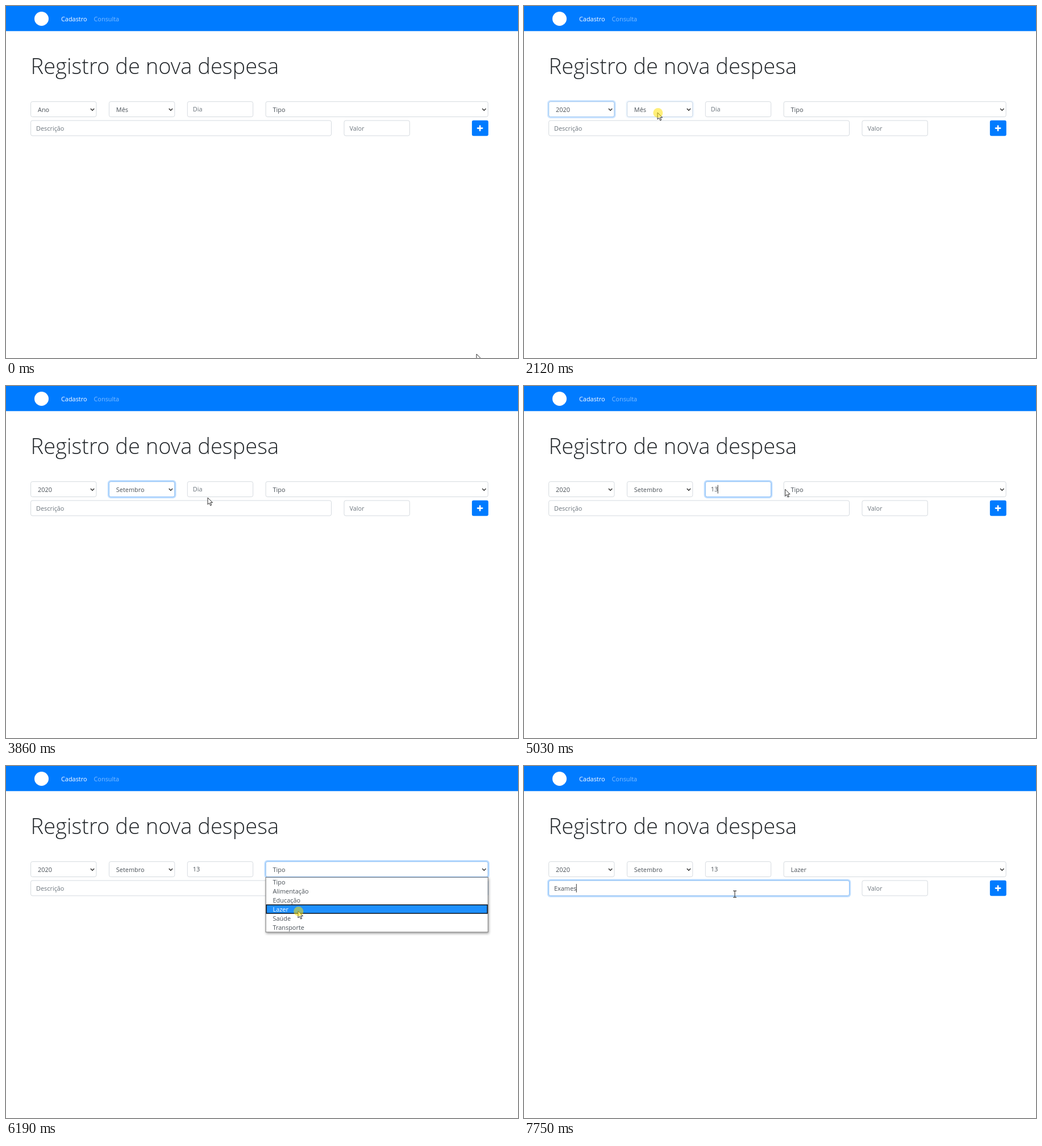
Recreate the animation shown at these times as an HTML page. Size 901x621 px, loop 8000 ms.

```html
<!DOCTYPE html>
<html lang="pt">
<head>
<meta charset="utf-8">
<title>Registro de nova despesa</title>
<style>
html, body { margin: 0; width: 100%; height: 100%; overflow: hidden; background: #fff; }
svg { display: block; width: 901px; height: 621px; font: 10.9px "Open Sans", "Noto Sans", sans-serif; }
</style>
</head>
<body>
<svg id="stage" viewBox="0 0 901 621">
  <defs>
    <filter id="shade" x="-10%" y="-20%" width="120%" height="150%">
      <feDropShadow dx="1" dy="2" stdDeviation="2" flood-color="#000" flood-opacity=".4"/>
    </filter>
  </defs>
  <rect width="901" height="621" fill="#fff"/>
  <rect width="901" height="44.3" fill="#007bff"/>
  <circle cx="62.5" cy="22.5" r="12.5" fill="#fff"/>
  <text x="97" y="26.8" fill="#fff">Cadastro</text>
  <text x="154.5" y="26.8" fill="#fff" fill-opacity=".5">Consulta</text>
  <text x="43.5" y="120" font-size="38.1" font-weight="300" fill="#212529">Registro de nova despesa</text>
  <rect x="819.9" y="201.7" width="28.9" height="27.6" rx="3" fill="#007bff"/>
  <path d="M830 215.6h8.2M834.1 211.5v8.2" stroke="#fff" stroke-width="2.6" stroke-linecap="round"/>
</svg>
<script>
const LOOP = 8000, STEP = 76, DELAY = 80, ROW = 16, HEIGHT = 26.85;
const COL = 137.85, GAP = 22.5;
const stage = document.getElementById("stage");

function add(tag, attrs, parent = stage, text = "") {
  const el = document.createElementNS("http://www.w3.org/2000/svg", tag);
  for (const name in attrs) el.setAttribute(name, attrs[name]);
  if (text) el.textContent = text;
  parent.append(el);
  return el;
}
const show = (el, on) => el.setAttribute("display", on ? "inline" : "none");
const clamp = (v, max = 1) => Math.max(0, Math.min(max, v));
const within = (t, from, to) => t >= from && t < to;

// In order of use: click times focus and pick, and text typed from a start at a steady pace
const fields = [
  { col: 0, span: 1, line: 0, focus: 920, pick: 1460, rows: "Ano 2020" },
  { col: 1, span: 1, line: 0, focus: 2090, pick: 3400,
    rows: "Mês Janeiro Fevereiro Março Abril Maio Junho Julho Agosto Setembro Outubro Novembro Dezembro" },
  { col: 2, span: 1, line: 0, focus: 4100, hint: "Dia", text: "13", start: 4630, pace: 150 },
  { col: 3, span: 3, line: 0, focus: 5340, pick: 6190,
    rows: "Tipo Alimentação Educação Lazer Saúde Transporte" },
  { col: 0, span: 4, line: 1, focus: 6510, hint: "Descrição", text: "Exames", start: 6650, pace: 220 },
  { col: 4, span: 1, line: 1, focus: LOOP, hint: "Valor", text: "", start: LOOP, pace: 1 }
];
const lists = fields.filter(f => f.rows), inputs = fields.filter(f => f.hint);
const clicks = fields.flatMap(f => f.pick ? [f.focus, f.pick] : [f.focus]);

// Pointer moves: start, end, x, y, power of the easing
const home = [828, 614];
const moves = [
  [70, 610, 100, 85], [610, 840, 72, 180], [1080, 1380, 87, 219], [1770, 2090, 235, 188],
  [2410, 2790, 245, 368, 2], [2940, 3320, 254, 351], [3630, 3860, 355, 197], [3960, 3960, 360, 184],
  [4860, 5170, 526, 181], [5730, 6040, 515, 266, .5], [6190, 6190, 514, 256], [6340, 6490, 371, 226]
];

function pointerAt(t) {
  let [px, py] = home;
  for (const [from, to, x, y, power = 1] of moves) {
    if (t < from) break;
    const steps = Math.round((to - from) / STEP) + 1;
    const k = clamp((Math.floor((t - from) / STEP + .1) + 1) / steps) ** power;
    px += (x - px) * k;
    py += (y - py) * k;
  }
  return [px, py];
}

const rowAt = (f, t) => clamp(Math.floor((pointerAt(t)[1] - 202) / ROW), f.names.length - 1);
const isOpen = (f, t) => within(t, f.focus + DELAY, f.pick + 150);

function valueAt(f, t) {
  if (f.rows) return f.names[t < f.pick + 150 ? 0 : rowAt(f, f.pick)];
  return f.text.slice(0, Math.max(0, Math.floor((t - f.start) / f.pace) + 1));
}

fields.forEach((f, i) => {
  f.x = 43.6 + f.col * COL;
  f.y = 168.66 + f.line * 33.4;
  f.w = f.span * COL - GAP;
  f.blur = i + 1 < fields.length ? fields[i + 1].focus : LOOP;
  f.textX = f.x + (f.rows ? 12.4 : 9.4);

  const box = { x: f.x, y: f.y, width: f.w, height: HEIGHT, rx: 3, "stroke-width": .85 };
  add("rect", { ...box, fill: "#fff", stroke: "#ced4da" });
  f.glow = add("g", { fill: "none" });
  add("rect", { ...box, stroke: "#80bdff" }, f.glow);
  add("rect", { x: f.x - 1.52, y: f.y - 1.52, width: f.w + 3.04, height: HEIGHT + 3.04, rx: 4.5,
    stroke: "#007bff", "stroke-opacity": .25, "stroke-width": 2.3 }, f.glow);
  f.label = add("text", { x: f.textX, y: f.y + (f.rows ? 18.2 : 17.6) });
  if (f.rows) {
    add("path", { d: `M${f.x + f.w - 10.1} ${f.y + 12.3}l3.2 3.2 3.2-3.2`, fill: "none",
      stroke: "#333", "stroke-width": 1.5 });
  } else {
    f.caret = add("rect", { y: f.y + 6, width: 1, height: 15, fill: "#333" });
  }
});

for (const f of lists) {
  f.names = f.rows.split(" ");
  f.menu = add("g", {});
  add("rect", { x: f.x, y: 196.4, width: f.w, height: f.names.length * ROW + .6, fill: "#fff",
    stroke: "#767676", filter: "url(#shade)" }, f.menu);
  f.bar = add("rect", { x: f.x + 1.1, width: f.w - 2.2, height: 15, fill: "#1e90ff",
    stroke: "#0b1018", "stroke-width": 1.5 }, f.menu);
  f.items = f.names.map((name, i) => add("text", { x: f.textX, y: 208.8 + i * ROW }, f.menu, name));
}

const suggest = add("g", {});
add("rect", { x: 43.5, y: 230, width: 139.5, height: 38, rx: 2, fill: "#292a2d", filter: "url(#shade)" }, suggest);
add("text", { x: 52, y: 252.2, "font-size": 8.7, "font-weight": 600, fill: "#fff" }, suggest, "Celular");

const pointer = add("g", {});
const arrow = add("path", { d: "M0 0V12L2.8 9.4L4.7 13.9L6.7 13L4.8 8.7H8.5Z", fill: "#fff",
  stroke: "#222", "stroke-width": .95 }, pointer);
const beam = add("path", { d: "M-2.8-5.6H-.7L0-5L.7-5.6H2.8M0-5V5M-2.8 5.6H-.7L0 5L.7 5.6H2.8", fill: "none",
  stroke: "#333", "stroke-width": 1.1 }, pointer);
const halo = add("circle", { cx: .8, cy: .5, r: 8.5, fill: "#ffe000", "fill-opacity": .52 }, pointer);

function draw(t) {
  for (const f of fields) {
    const value = valueAt(f, t);
    f.label.textContent = value || f.hint;
    f.label.setAttribute("fill", value ? "#495057" : "#6c757d");
    f.glow.setAttribute("opacity", clamp((t - f.focus) / 150) * (1 - clamp((t - f.blur) / 150)));
    if (f.caret) {
      show(f.caret, within(t, f.focus, f.blur));
      f.caret.setAttribute("x", f.textX - .5 + (value ? f.label.getComputedTextLength() : 0));
    }
  }

  for (const f of lists) {
    const row = rowAt(f, t);
    show(f.menu, isOpen(f, t));
    f.bar.setAttribute("y", 197 + row * ROW);
    f.items.forEach((el, i) => el.setAttribute("fill", i === row ? "#fff" : "#495057"));
  }
  const note = fields[4];
  show(suggest, within(t, note.focus + DELAY, note.start));

  const [x, y] = pointerAt(t);
  const overInput = !lists.some(f => isOpen(f, t)) &&
    inputs.some(f => within(x, f.x, f.x + f.w) && within(y, f.y, f.y + HEIGHT));
  pointer.setAttribute("transform", `translate(${x} ${y})`);
  show(arrow, !overInput);
  show(beam, overInput);
  show(halo, clicks.some(c => within(t, c, c + DELAY)));
}

const begin = performance.now();
function tick() {
  draw((performance.now() - begin) % LOOP);
  requestAnimationFrame(tick);
}
tick();
</script>
</body>
</html>
```
